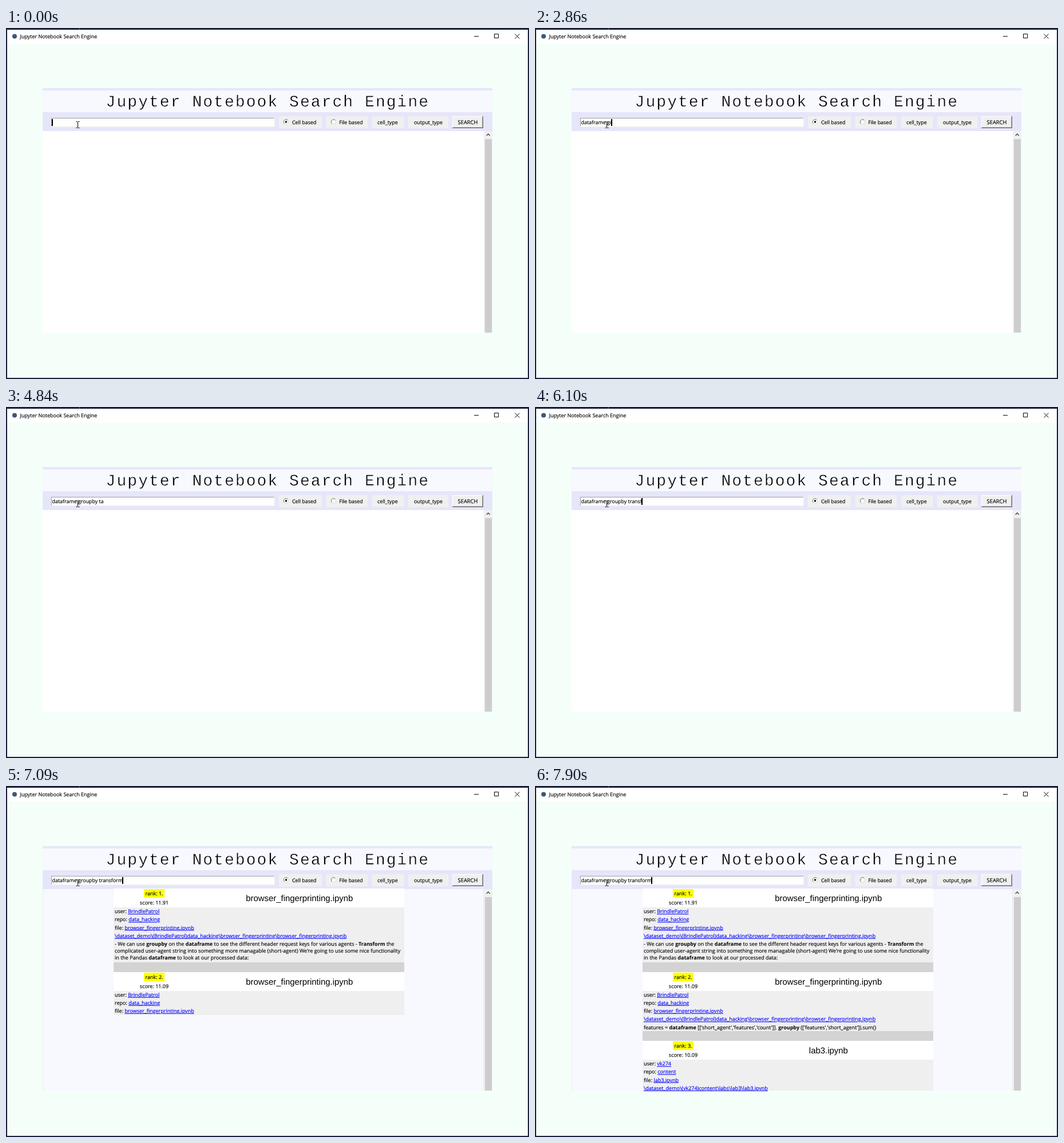
An HTML page for the animation above (8 s loop, 914 by 613 pixels).

```html
<!DOCTYPE html>
<html lang="en">
<head>
<meta charset="utf-8">
<title>Jupyter Notebook Search Engine</title>
<style>
  html, body { margin: 0; width: 100%; height: 100%; overflow: hidden; background: #1a1e3c; }
  svg { display: block; width: 914px; height: 613px; }
  text { font: 9px "Open Sans", "Noto Sans", sans-serif; white-space: pre; text-rendering: geometricPrecision; stroke: #000; stroke-width: .15px; }
  rect { shape-rendering: crispEdges; }
  .mid { text-anchor: middle; }
  .form { font-size: 8.9px; }
  .caps { font-size: 9.4px; }
  .head { font: 28px "Liberation Mono", monospace; letter-spacing: 2.05px; stroke: #f8f8ff; stroke-width: .5px; }
  .file { font: 14.9px "Liberation Sans", Arial, sans-serif; text-anchor: middle; stroke: none; }
  .bold { font-weight: 700; stroke: none; }
  .link { fill: #00f; stroke: #00f; text-decoration: underline 1px; text-underline-offset: 1px; text-decoration-skip-ink: none; }
</style>
</head>
<body>
<svg id="stage" viewBox="0 0 914 613"></svg>
<script>
const LOOP = 8000;
const KEYS = "dataframe groupby ta<ransform"; // "<" is backspace
const KEY_TIMES = [330, 540, 670, 730, 930, 1130, 1270, 1740, 1860, 2300, 2590, 2860, 3150, 3260, 3460,
  3790, 3940, 4120, 4380, 4640, 5380, 5440, 5640, 5770, 5840, 6100, 6230, 6360, 6490];
const BLINKS = [330, 670, 1270, 1530, 2130, 2460, 3060, 3390, 3990, 4250, 4840, 5180, 5770, 6100, 6690, 7020, 7570, 7900];
const SHOW = [7020, 7090, 7160, 7240];

const stage = document.getElementById("stage");
const timed = [];
let layer = stage;

function add(tag, attrs, parent = layer) {
  const el = document.createElementNS("http://www.w3.org/2000/svg", tag);
  for (const k in attrs) el.setAttribute(k, attrs[k]);
  return parent.appendChild(el);
}
const box = (x, y, r, b, fill) => add("rect", { x, y, width: r - x, height: b - y, fill });
const line = (d, stroke = "#000", width = 1) => add("path", { d, stroke, "stroke-width": width, fill: "none" });

// Parts between bars take the accent class.
function label(x, y, str, cls = "", accent = "") {
  const el = add("text", { x, y, class: cls });
  el.setAttributeNS("http://www.w3.org/XML/1998/namespace", "xml:space", "preserve");
  str.split("|").forEach((part, i) => {
    if (part) add("tspan", i % 2 ? { class: accent } : {}, el).textContent = part;
  });
  return el;
}

function from(step, draw) {
  const parent = layer;
  layer = add("g", {}, parent);
  timed.push([layer, SHOW[step]]);
  draw();
  layer = parent;
}

function drawWindow() {
  box(0, 0, 914, 613, "#1a1e3c");
  box(128, 1, 129, 2, "#c8c8d0");
  box(2, 3, 912, 611, "#f5fffa");
  box(2, 3, 912, 27, "#fff");
  add("circle", { cx: 15, cy: 14.5, r: 4, fill: "#345a80" });
  label(24.5, 18, "Jupyter Notebook Search Engine");
  line("M818 14.5h8M853.5 10.5h7v7h-7z");
  line("M889.5 10.5l8 8M897.5 10.5l-8 8");
}

function drawRadio(x, on) {
  add("circle", { cx: x, cy: 164, r: 4, fill: "#fff", stroke: "#dcdcdc" });
  line(`M${x - 3} 167A4 4 0 0 1 ${x + 3} 161`, "#777");
  if (on) add("circle", { cx: x, cy: 164, r: 1.7, fill: "#000" });
}

function drawForm() {
  box(64, 105, 850, 180, "#e6e6fa");
  box(64, 109, 850, 147, "#f8f8ff");
  label(174.6, 137, "Jupyter Notebook Search Engine", "head");
  box(79, 157, 470, 173, "#fff");
  line("M79 157.5h390M79.5 157v15", "#a0a0a0");
  line("M80 172.5h389M469.5 158v15", "#f0f0f0");
  for (const [x, r] of [[477, 552], [560, 632], [640, 695], [703, 773], [780, 834]]) box(x, 154, r, 175, "#f0f0f0");
  drawRadio(489.5, true);
  drawRadio(572.5, false);
  label(500, 168, "Cell based", "form");
  label(582.3, 168, "File based", "form");
  label(649, 168, "cell_type", "form");
  label(713, 168, "output_type", "form");
  line("M780 154.5h53M780.5 154v20", "#fff");
  line("M780 174.5h54M833.5 154v21", "#696969");
  line("M781 173.5h52M832.5 155v19", "#a8a8a8");
  label(807, 168, "SEARCH", "caps mid");
}

function drawScroll() {
  box(835, 180, 850, 532, "#f0f0f0");
  box(837, 194, 849, 532, "#cdcdcd");
  line("M839.7 188l3-3l3 3", "#444", 1.4);
}

function drawHead(y, rank, score, file) {
  box(188, y, 696, y + 33, "#fff");
  box(241, y + 1, 277, y + 16, "#ff0");
  label(259, y + 11.5, `rank: ${rank}.`, "mid");
  label(259, y + 27.8, `score: ${score}`, "mid");
  label(512.8, y + 21.5, file, "file");
}

function drawMeta(y, user, repo, file) {
  [["user", user], ["repo", repo], ["file", file]].forEach(([name, value], i) =>
    label(190, y + 42.8 + i * 14.1, `${name}: |${value}|`, "", "link"));
}

const drawPath = (y, path) => label(190, y + 85.4, `|${path}|`, "", "link");
const drawText = (y, str) => label(190, y, str, "", "bold");

function drawResults() {
  const grey = "#efefef", gap = "#d3d3d3";
  const user = "BrindlePatrol", repo = "data_hacking", file = "browser_fingerprinting.ipynb";
  const path = `\\dataset_demo\\(${user})${repo}\\browser_fingerprinting\\${file}`;

  from(0, () => {
    box(64, 180, 835, 532, "#f8f8ff");
    box(64, 180, 65, 532, "#ececf2");
    box(834, 180, 835, 532, "#ececf2");
    box(188, 212, 696, 295, grey);
    drawHead(179, 1, "11.91", file);
  });
  from(1, () => {
    box(188, 212, 696, 308, grey);
    box(188, 308, 696, 325, gap);
    drawText(291, "complicated user-agent string into something more managable (short-agent) We're going to use some nice functionality");
    drawText(303, "in the Pandas |dataframe| to look at our processed data:");
    drawHead(325, 2, "11.09", file);
    box(188, 358, 696, 400, grey);
    drawMeta(325, user, repo, file);
  });
  from(0, () => {
    drawMeta(179.5, user, repo, file);
    drawPath(179.5, path);
    drawText(279, "- We can use |groupby| on the |dataframe| to see the different header request keys for various agents - |Transform| the");
  });
  from(2, () => {
    box(188, 400, 696, 428, grey);
    drawPath(325, path);
    drawText(424.5, "features = |dataframe| [['short_agent','features','count']]. |groupby| (['features','short_agent']).sum()");
    box(188, 428, 696, 445, gap);
    drawHead(445, 3, "10.09", "lab3.ipynb");
  });
  from(3, () => {
    box(188, 478, 696, 532, grey);
    drawMeta(445.5, "vk274", "content", "lab3.ipynb");
    drawPath(445.5, "\\dataset_demo\\(vk274)content\\labs\\lab3\\lab3.ipynb");
  });
}

drawWindow();
drawForm();
box(64, 180, 835, 532, "#fff");
drawResults();
drawScroll();
const query = label(80.6, 168, " ", "form").firstChild;
const caret = box(80, 159, 82, 171, "#000");
line("M122.5 163.5h2l1 1l1-1h2M125.5 164v10M122.5 174.5h2l1-1l1 1h2");

const passed = (list, t) => list.filter(at => at <= t).length;

function typed(t) {
  let out = "";
  for (const key of KEYS.slice(0, passed(KEY_TIMES, t))) out = key === "<" ? out.slice(0, -1) : out + key;
  return out;
}

function render(t) {
  const str = typed(t);
  if (query.textContent !== str) query.textContent = str;
  caret.setAttribute("x", 80 + Math.floor(str ? query.getComputedTextLength() : 0));
  caret.style.display = passed(BLINKS, t) % 2 ? "none" : "";
  for (const [el, at] of timed) el.style.display = t >= at ? "" : "none";
}

const start = performance.now();
function tick() {
  render((performance.now() - start) % LOOP);
  requestAnimationFrame(tick);
}
tick();
</script>
</body>
</html>
```
